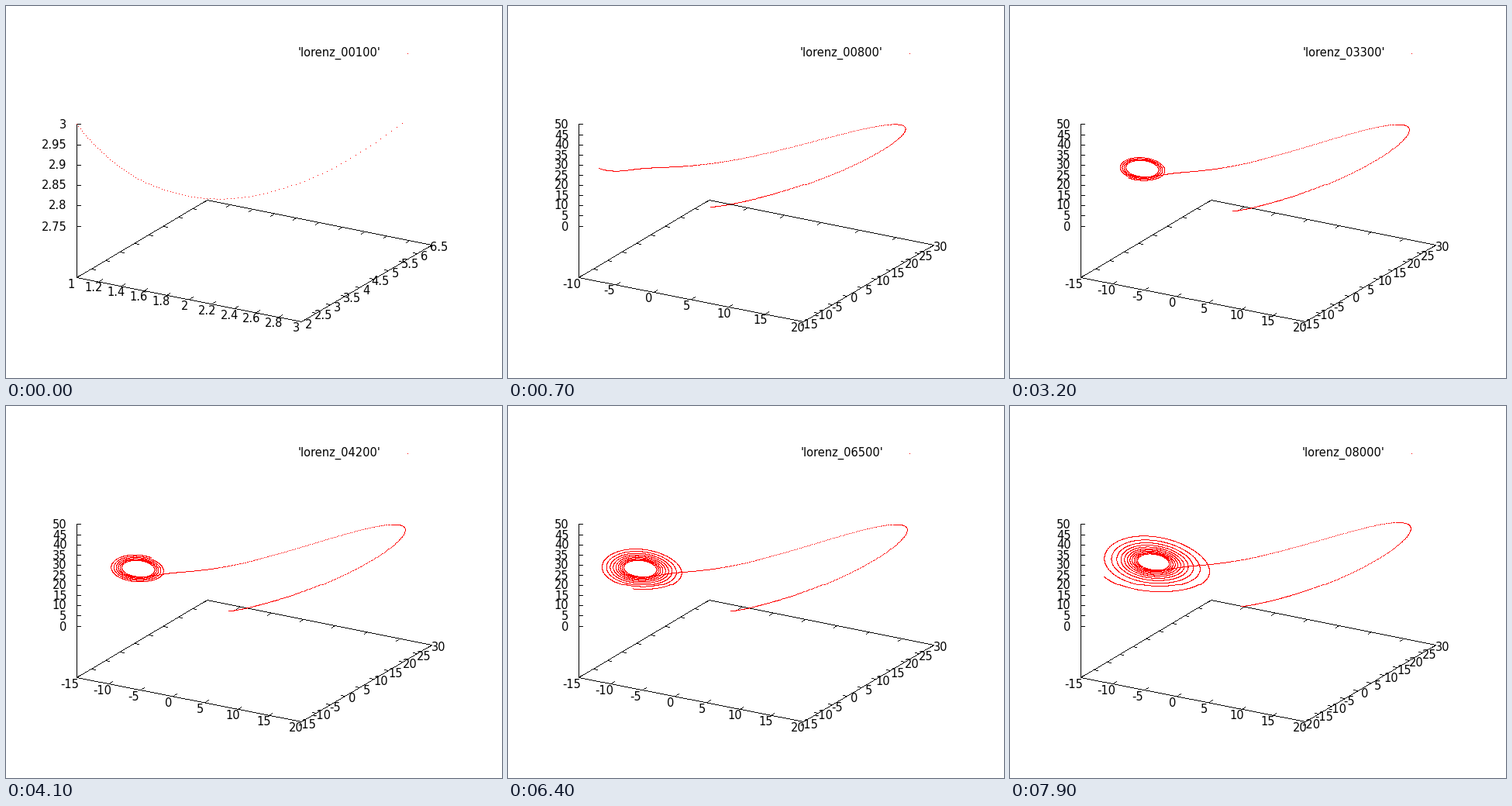
These frames come from a looping animation (640x480 px, 8 s). A matplotlib script:

```python
import numpy as np
import matplotlib.pyplot as plt
from matplotlib.animation import FuncAnimation

W, H, DPI = 640, 480, 100
FRAMES, INTERVAL, PER_FRAME = 80, 100, 100
PX = 72 / DPI
BLACK, RED = (0, 0, 0, 255), (255, 0, 0, 255)

# View: 60 degrees tilt, 30 degrees turn; the data box floats above the base
CENTER = np.array([320, 230])
SCALE_X, SCALE_Y = 168.0, 114.5
TILT, TURN = np.radians([60, 30])
TICK = 5


def project(u, v, w):
    """Pixel of a point; u, v, w run 0..1 over the box, w = 0 is the base."""
    a, b, c = 2 * u - 1, 2 * v - 1, 2 * w - 1
    x = a * np.cos(TURN) + b * np.sin(TURN)
    depth = b * np.cos(TURN) - a * np.sin(TURN)
    y = -depth * np.cos(TILT) - c * np.sin(TILT)
    flat = np.stack([x * SCALE_X, y * SCALE_Y], axis=-1)
    return CENTER + np.trunc(flat).astype(int)


def lift(f):
    return (1 + 2 * f) / 3


def lorenz(count, dt=0.001, sigma=10, rho=28, beta=8 / 3):
    pts = np.empty((count, 3))
    x, y, z = 1.0, 2.0, 3.0
    for i in range(count):
        pts[i] = x, y, z
        dx, dy, dz = sigma * (y - x), x * (rho - z) - y, x * y - beta * z
        x, y, z = x + dx * dt, y + dy * dt, z + dz * dt
    return pts


def tick_step(span):
    power = 10 ** np.floor(np.log10(span))
    slots = 20 * power / span
    for limit, step in ((40, .05), (20, .1), (10, .2), (4, .5), (2, 1)):
        if slots > limit:
            return step * power
    return 2 * power


def ticks(values, pad=0.0):
    """Tick values that enclose the data, on round steps."""
    lo, hi = values.min(), values.max()
    step = tick_step(hi - lo)
    first = np.floor(lo / step + 1e-9)
    last = np.ceil(hi / step + pad - 1e-9)
    return np.round(np.arange(first, last + 1) * step, 6) + 0.0


def fraction(values, marks):
    return (values - marks[0]) / (marks[-1] - marks[0])


def draw_line(img, p, q):
    n = int(np.abs(np.subtract(q, p)).max()) + 1
    cols, rows = np.rint(np.linspace(p, q, n)).astype(int).T
    img[rows, cols] = BLACK


def draw_tick(img, p, direction):
    step = TICK * direction / np.hypot(*direction)
    draw_line(img, p, p + np.rint(step).astype(int))


POINTS = lorenz(FRAMES * PER_FRAME)

plt.rcParams["font.family"] = "DejaVu Sans"
fig = plt.figure(figsize=(W / DPI, H / DPI), dpi=DPI, facecolor="white")
ax = fig.add_axes([0, 0, 1, 1])
ax.set_xlim(0, W)
ax.set_ylim(H, 0)
ax.axis("off")
canvas = fig.figimage(np.zeros((H, W, 4), np.uint8), origin="upper", zorder=5)
FONT_PX = 44 / 3
BLANK = 0.318 * FONT_PX
FONT = dict(fontsize=FONT_PX * PX, color="black", va="baseline")
title = ax.text(484, 65, "", ha="right", **FONT)
labels = []


def add_label(x, y, value, ha="center"):
    # centred non-negative numbers carry a leading blank
    if ha == "center" and value >= 0:
        x += BLANK / 2
    labels.append(ax.text(x, y + 5.5, f"{value:g}", ha=ha, **FONT))


def draw_axes(img, xt, yt, zt):
    while labels:
        labels.pop().remove()
    left, front, far, back = (project(u, v, 0)
                              for u, v in ((0, 0), (1, 0), (1, 1), (0, 1)))
    for p, q in ((left, front), (front, far), (far, back), (back, left),
                 (left, project(0, 0, 1))):
        draw_line(img, p, q)
    along_x, along_y = front - left, back - left

    for value, f in zip(xt, fraction(xt, xt)):
        p = project(f, 0, 0)
        draw_tick(img, p, along_y)
        draw_tick(img, project(f, 1, 0), -along_y)
        add_label(p[0] - 9, p[1] + 8, value)
    for value, f in zip(yt, fraction(yt, yt)):
        p = project(1, f, 0)
        draw_tick(img, p, -along_x)
        draw_tick(img, project(0, f, 0), along_x)
        add_label(p[0] + 7, p[1] + 3, value)
    for value, f in zip(zt, fraction(zt, zt)):
        p = project(0, 0, lift(f))
        draw_tick(img, p, np.array([1, 0]))
        add_label(78.5, p[1], value, "right")


def draw_dots(img, pts, marks):
    u, v, w = (fraction(pts[:, k], t) for k, t in enumerate(marks))
    cols, rows = project(u, v, lift(w)).T
    img[rows, cols] = RED
    img[61, 518] = RED


def update(i):
    count = (i + 1) * PER_FRAME
    pts = POINTS[:count]
    marks = ticks(pts[:, 0]), ticks(pts[:, 1], pad=0.01), ticks(pts[:, 2])
    img = np.zeros((H, W, 4), np.uint8)
    draw_axes(img, *marks)
    draw_dots(img, pts, marks)
    canvas.set_data(img)
    title.set_text(f"'lorenz_{count:05d}'")
    return [canvas, title, *labels]


anim = FuncAnimation(fig, update, frames=FRAMES, interval=INTERVAL,
                     repeat=True, repeat_delay=0, blit=False)
plt.show()
```
